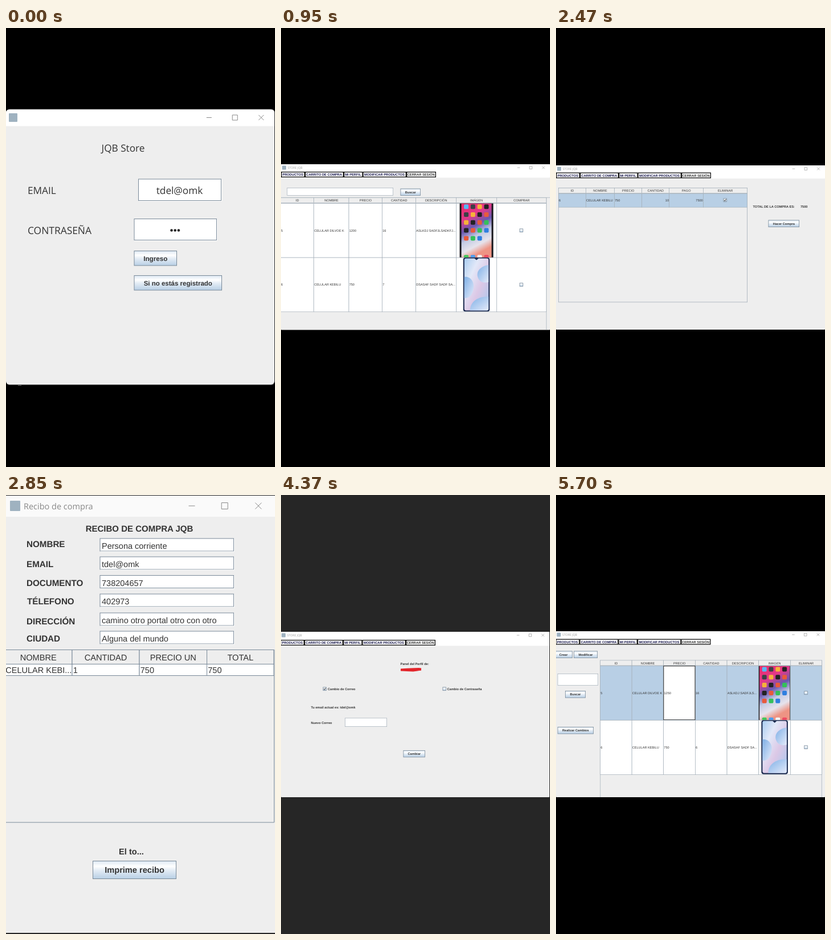
Recreate the animation shown at these times as an HTML page. Size 472x767 px, loop 6650 ms.

```html
<!DOCTYPE html>
<html lang="es">
<head>
<meta charset="utf-8">
<style>
  html, body { margin: 0; width: 100%; height: 100%; overflow: hidden; background: #000; }
  #stage { display: block; width: 472px; height: 767px; }
  text { font-family: "Liberation Sans", Arial, sans-serif; text-rendering: geometricPrecision; white-space: pre; }
  .ui { font-family: "Open Sans", "Noto Sans", sans-serif; }
  .bold { font-weight: 700; }
</style>
</head>
<body>
<svg id="stage" viewBox="0 0 472 767">
  <defs>
    <linearGradient id="metal" x2="0" y2="1">
      <stop stop-color="#dde8f3"/><stop offset=".3" stop-color="#fff"/>
      <stop offset=".5" stop-color="#e6eef6"/><stop offset="1" stop-color="#b8cfe5"/>
    </linearGradient>
    <linearGradient id="sunset" x2=".3" y2="1">
      <stop stop-color="#f02a66"/><stop offset=".3" stop-color="#e03a8c"/>
      <stop offset=".5" stop-color="#6a58b0"/><stop offset=".68" stop-color="#c3cbe4"/>
      <stop offset=".85" stop-color="#e6e3ec"/><stop offset="1" stop-color="#ee9484"/>
    </linearGradient>
    <linearGradient id="sky" x2="1" y2="1">
      <stop stop-color="#a9cdf0"/><stop offset=".3" stop-color="#e2e8f8"/>
      <stop offset=".6" stop-color="#dcc8e6"/><stop offset="1" stop-color="#a6c8ee"/>
    </linearGradient>
    <linearGradient id="wave" x2="1" y2="1">
      <stop stop-color="#7fb0e6"/><stop offset="1" stop-color="#e4eafa"/>
    </linearGradient>
  </defs>
</svg>
<script>
const SCENE_MS = 950, SMALL = 5.6, CELL = 5.55;
const EDGE = '#7a8a99', SOFT_EDGE = '#a3aeb8', INK = '#333', PANEL = '#eee', SELECTED = '#b8cfe5';
const SHOP = 'JQB', MAIL = 'tdel@omk', PHONE_A = 'CELULAR DILVOE K', PHONE_B = 'CELULAR KEBILU';

const rect = (x, y, w, h, fill, extra = '') =>
  `<rect x="${x}" y="${y}" width="${w}" height="${h}" fill="${fill}" ${extra}/>`;
const path = (d, stroke, width = 1, fill = 'none') =>
  `<path d="${d}" fill="${fill}" stroke="${stroke}" stroke-width="${width}"/>`;
const shape = (d, fill) => path(d, 'none', 0, fill);
const crop = (x, y, w, h, content) => `<svg x="${x}" y="${y}" width="${w}" height="${h}">${content}</svg>`;
const text = (x, y, s, size, { cls = '', anchor = 'start', fill = INK } = {}) =>
  `<text x="${x}" y="${y}" font-size="${size}" class="${cls}" text-anchor="${anchor}" fill="${fill}">${s}</text>`;
const bold = (x, y, s, size = SMALL, anchor = 'start') => text(x, y, s, size, { cls: 'bold', anchor });
const ui = (x, y, s, size, fill = INK, anchor = 'start') => text(x, y, s, size, { cls: 'ui', fill, anchor });

// A box given by its outer edges, with the border drawn inside.
const box = (x, y, r, b, fill, width = .7, color = EDGE) =>
  rect(x + width / 2, y + width / 2, r - x - width, b - y - width, fill, `stroke="${color}" stroke-width="${width}"`);
const field = (x, y, r, b) => box(x, y, r, b, '#fff', .7, SOFT_EDGE);
const bigField = (x, y, r, b) => box(x, y, r, b, '#fff', 1) +
  path(`M${x + 1} ${b + .5}H${r + .5}V${y + 1}`, '#fff');
const button = (x, y, r, b, label, size = SMALL, width = .8) =>
  box(x, y, r, b, 'url(#metal)', width) + bold((x + r) / 2, (y + b) / 2 + size * .37, label, size, 'middle');
const check = (x, y, on) => box(x, y, x + 6.4, y + 6.4, 'url(#metal)', .8) +
  (on ? path(`M${x + 1.6} ${y + 2.8}l1.2 2 2.2-3.4`, '#222', .9) : '');

const controls = ([a, b, c], y, r, color, width) =>
  path(`M${a - r} ${y}h${2 * r}M${b - r} ${y - r}h${2 * r}v${2 * r}h${-2 * r}z` +
    `M${c - r} ${y - r}l${2 * r} ${2 * r}m0 ${-2 * r}l${-2 * r} ${2 * r}`, color, width);
const icon = (x, y, size) => rect(x, y, size, size, '#9fb2c0', 'rx="1"');

// Main shop window: title bar, menu strip and grey panel.
function shop(top, menuY, dx, bottom, right = 472) {
  const menu = [[0, 'PRODUCTOS'], [42, 'CARRITO DE COMPRA'], [110, 'MI PERFIL'],
    [143.5, 'MODIFICAR PRODUCTOS'], [220, 'CERRAR SESIÓN'], [272]];
  let out = rect(0, top, right, bottom - top, PANEL, 'rx="1"') +
    rect(0, top, right, menuY + 10.5 - top, '#fff', 'rx="1"') +
    icon(2 + dx, top + 2.5, 7) + ui(11.7 + dx, top + 8.2, 'STORE ' + SHOP, 5.2, '#999') +
    controls([417 + dx, 438.3 + dx, 460.5 + dx], top + 6, 2.3, '#888', .6);
  menu.slice(0, -1).forEach(([x, label], i) => {
    const next = menu[i + 1][0];
    out += box(x + dx, menuY, next + dx, menuY + 10, '#fff', 1.3, '#111') +
      text((x + next) / 2 + dx - .3, menuY + 7.2, label, 5.75,
        { cls: 'bold', anchor: 'middle', fill: i < 4 ? '#15154a' : INK });
  });
  return out;
}

const gridColor = width => width < 1 ? SOFT_EDGE : EDGE;

function header(cols, y, b, labels, size = CELL, width = .7) {
  return labels.map((label, i) => box(cols[i], y, cols[i + 1] + width, b, PANEL, width, gridColor(width)) +
    text((cols[i] + cols[i + 1]) / 2 + .5, (y + b) / 2 + size * .4, label, size, { anchor: 'middle' })).join('');
}
function row(cols, y, b, values, { fill = '#fff', size = CELL, width = .7, pad = 1, right = [], baseline } = {}) {
  let out = '';
  for (let i = 0; i < cols.length - 1; i++) {
    out += box(cols[i], y, cols[i + 1] + width, b + width, fill, width, gridColor(width));
    const end = right.includes(i);
    if (values[i]) out += text(end ? cols[i + 1] - .3 : cols[i] + pad, baseline || (y + b) / 2 + 2.2,
      values[i], size, { anchor: end ? 'end' : 'start' });
  }
  return out;
}

// Two product pictures stacked in table cells; (x, y) is the corner of the upper cell.
function pictures(x, y, w) {
  const mid = w / 2, side = mid - 23.3;
  const colors = ['#58b7f4', '#f2f2f2', '#e85a3c', '#3b4046', '#f05a78', '#34c05a', '#f6b23a', '#fafafa', '#2f7fe0', '#222'];
  const app = (col, top, color) => rect(mid - 22 + col * 11.8, top, 8, 8, color, 'rx="1.8"');
  let upper = rect(mid - 29.5, -8, 59, 120, '#17171c') + rect(mid - 26.5, 0, 53, 95, 'url(#sunset)');
  for (let i = 0; i < 19; i++) {
    const line = i >> 2;
    upper += app(i % 4, 1.7 + line * 13.8, colors[(i * 3 + line) % 10]);
  }
  ['#42c75a', '#4a9df0', '#f4f4f4', '#ee4b62'].forEach((color, i) => upper += app(i, 90, color));
  const lower = rect(side, 0, 46.5, 94.5, '#16254a', 'rx="4"') +
    rect(side + 2, 1.5, 42.5, 91, 'url(#sky)', 'rx="3"') +
    shape(`M${side + 2} 34c10-2 18 8 16 20s-7 17-16 17z`, 'url(#wave)') +
    shape(`M${side + 44.5} 13c-14 2-22 11-19 21s12 11 19 9z`, 'url(#wave)') +
    shape(`M${side + 12} 92.5c0-14 12-25 32.5-24v21q0 3-3 3z`, 'url(#wave)') +
    shape(`M${mid - 4} 1.2h8l-4 3.4z`, '#16254a');
  return crop(x + .5, y + .5, w - .8, 94.3, upper) + crop(x + .5, y + 95, w - .8, 94.6, lower);
}

function login() {
  return rect(0, 141, 472, 483.5, '#2c2c2c', 'rx="7"') + rect(0, 142.5, 471, 480.5, PANEL, 'rx="6"') +
    shape('M0 171.5V148q0-5.5 6-5.5H465q6 0 6 5.5v23.5z', '#fff') +
    rect(21, 624, 6, .8, '#888') + icon(5, 149, 15) +
    controls([356.3, 401.7, 447.8], 156.5, 4.5, '#888', 1) +
    ui(205.5, 216, SHOP + ' Store', 17.2, INK, 'middle') +
    ui(38, 290, 'EMAIL', 17.2) + ui(38, 359.5, 'CONTRASEÑA', 17.4) +
    bigField(232, 263.5, 378, 302) + ui(304.5, 290, MAIL, 17.2, INK, 'middle') +
    bigField(224.5, 333, 370, 371) +
    [290.5, 296.7, 302.9].map(x => `<circle cx="${x}" cy="353.5" r="2.3" fill="#222"/>`).join('') +
    button(224.5, 389, 300, 415.5, 'Ingreso', 11.7, 1) +
    button(224.5, 432, 379, 458.5, 'Si no estás registrado', 11.5, 1);
}

function products() {
  const cols = [-1, 57.3, 118.7, 177.2, 236.3, 307, 378, 465.3];
  return shop(238, 251, 0, 527.5) + field(10.5, 279, 197, 293) + button(209.5, 280.5, 245, 293, 'Buscar') +
    path('M0 296.3H472M465.7 296V527', SOFT_EDGE, .7) +
    header(cols, 296, 306, ['ID', 'NOMBRE', 'PRECIO', 'CANTIDAD', 'DESCRIPCIÓN', 'IMÁGEN', 'COMPRAR']) +
    row(cols, 306, 400.8, ['5', PHONE_A, '1200', '16', 'ASLKDJ SADFJLSADKFJ...']) +
    row(cols, 400.8, 495.5, ['6', PHONE_B, '750', '7', 'DSASAF SADF SADF SA...']) +
    pictures(307, 306, 71) + check(418.5, 350.5) + check(418.5, 445.3);
}

function cart() {
  const cols = [4, 52, 102, 150.3, 198.3, 258, 335.3];
  return shop(240, 252.5, 0, 527) + box(4, 279, 336, 479.3, PANEL, .8, SOFT_EDGE) +
    header(cols, 279, 289, ['ID', 'NOMBRE', 'PRECIO', 'CANTIDAD', 'PAGO', 'ELIMINAR']) +
    row(cols, 289, 312.8, ['6', PHONE_B, '750', '10', '7500'], { fill: SELECTED, right: [3, 4] }) +
    check(293.5, 297.5, true) + bold(345.5, 314, 'TOTAL DE LA COMPRA ES:') + bold(429, 314, '7500') +
    button(372.5, 335.5, 427, 348, 'Hacer Compra');
}

function receipt() {
  const cols = [-3, 115.5, 233.5, 352, 469.5];
  const lines = [
    ['NOMBRE', 36, 91, 75.5, 'Persona corriente'], ['EMAIL', 36, 126, 107.5, MAIL],
    ['DOCUMENTO', 36, 159, 140, '738204657'], ['TÉLEFONO', 37, 191, 172.5, '402973'],
    ['DIRECCIÓN', 36, 226, 205.5, 'camino otro portal otro con otro'], ['CIUDAD', 36, 256, 237.5, 'Alguna del mundo']];
  return rect(0, 0, 472, 767, '#262626') + rect(0, 1, 472, 764, PANEL) + rect(0, 1, 472, 37, '#fafafa') +
    icon(7, 10, 18) + ui(31, 25, 'Recibo de compra', 14.5, '#888') +
    controls([326, 383.7, 442.8], 19, 5.5, '#888', 1) +
    bold(234, 64, 'RECIBO DE COMPRA ' + SHOP, 15, 'middle') +
    lines.map(([label, x, y, top, value]) => bold(x, y, label, 15.2) +
      bigField(164.5, top, 400, top + 23) + text(168, top + 18.5, value, 14.5)).join('') +
    path('M0 270.5H470.5V572H0', EDGE) +
    header(cols, 270, 296, ['NOMBRE', 'CANTIDAD', 'PRECIO UN', 'TOTAL'], 14.6, 1) +
    row(cols, 295, 315, ['CELULAR KEBI...', '1', '750', '750'], { size: 14.5, width: 1, pad: 2.3, baseline: 311 }) +
    bold(220, 628, 'El to...', 14.6, 'middle') + button(152, 639, 299, 671, 'Imprime recibo', 14.6, 1);
}

function profile() {
  return rect(0, 0, 472, 767, '#262626') + shop(239, 253, -1, 528, 471) +
    bold(209.5, 297, 'Panel del Perfil de:') +
    path('M210 304.5l12-.8 20-.7 4 .6-28 2-8 .8 16 .8 20-1.6-14 1.8-12-.3 18-1 8-.4', '#e3252b', 2) +
    check(73.5, 335.5, true) + bold(82, 341, 'Cambio de Correo') +
    check(283.5, 335.5) + bold(291.5, 341, 'Cambio de Contraseña') +
    bold(52.5, 373, 'Tu email actual es: ' + MAIL) + bold(52.5, 400, 'Nuevo Correo') +
    field(112, 389.5, 186, 405) + button(214.5, 446, 253, 458.3, 'Cambiar');
}

function create() {
  return shop(239, 252, 0, 528) + button(-1.5, 273, 30, 285.5, 'Crear') + button(32.5, 273, 74, 285.5, 'Modificar') +
    box(256.5, 336.5, 351.8, 355.3, PANEL, .9) + box(341.5, 336.5, 351.8, 355.3, 'url(#metal)', .9) +
    shape('M344.3 344.8h5l-2.5 2.7z', INK) + bold(258.5, 348, 'SELECCIONE') +
    [['NOMBRE', 376], ['PRECIO', 406], ['CANTIDAD', 438.5], ['DESCRIPCIÓN', 476]]
      .map(([label, y]) => bold(42, y, label)).join('') +
    field(114.5, 363.5, 209.5, 382.3) + field(114.5, 393.5, 209.5, 412.3) + field(114.5, 426.3, 209.5, 445) +
    field(118.3, 463.7, 355.3, 482.5) + button(253.3, 384.5, 325.3, 404, 'Seleccionar Imágen') +
    button(194, 513, 251, 533.5, 'Registrar') + rect(0, 528, 472, 10, '#000');
}

function edit() {
  const cols = [77.3, 132.8, 188.3, 244, 299.7, 355.3, 411, 466];
  return shop(238, 251.5, -.6, 528) + button(-3, 272.5, 29, 285, 'Crear') + button(31, 272.5, 73, 285, 'Modificar') +
    field(2.7, 312, 74, 333) + button(16, 342, 52, 354.5, 'Buscar') + button(2.7, 405, 66, 417.5, 'Realizar Cambios') +
    path('M77.7 288.5V528M466.3 288.5V528', SOFT_EDGE, .7) +
    header(cols, 288.5, 298.3, ['ID', 'NOMBRE', 'PRECIO', 'CANTIDAD', 'DESCRIPCION', 'IMAGEN', 'ELIMINAR']) +
    row(cols, 298.3, 393, ['5', PHONE_A, '', '16', 'ASLKDJ SADFJLS...'], { fill: SELECTED }) +
    box(188.3, 298.3, 244.5, 393.3, '#fff', 1, '#222') + text(189.5, 347.9, '1250', CELL) +
    row(cols, 393.3, 488.3, ['6', PHONE_B, '750', '6', 'DSASAF SADF SA...']) +
    pictures(355.3, 298.3, 55.7) + check(435.3, 342.5) + check(435.3, 437.5);
}

const stage = document.getElementById('stage');
const scenes = [login, products, cart, receipt, profile, create, edit].map(draw => {
  const group = document.createElementNS('http://www.w3.org/2000/svg', 'g');
  group.innerHTML = rect(0, 0, 472, 767, '#000') + draw();
  return stage.appendChild(group);
});

function tick() {
  const current = Math.floor(performance.now() / SCENE_MS) % scenes.length;
  scenes.forEach((group, i) => group.style.display = i === current ? '' : 'none');
  requestAnimationFrame(tick);
}
tick();
</script>
</body>
</html>
```
